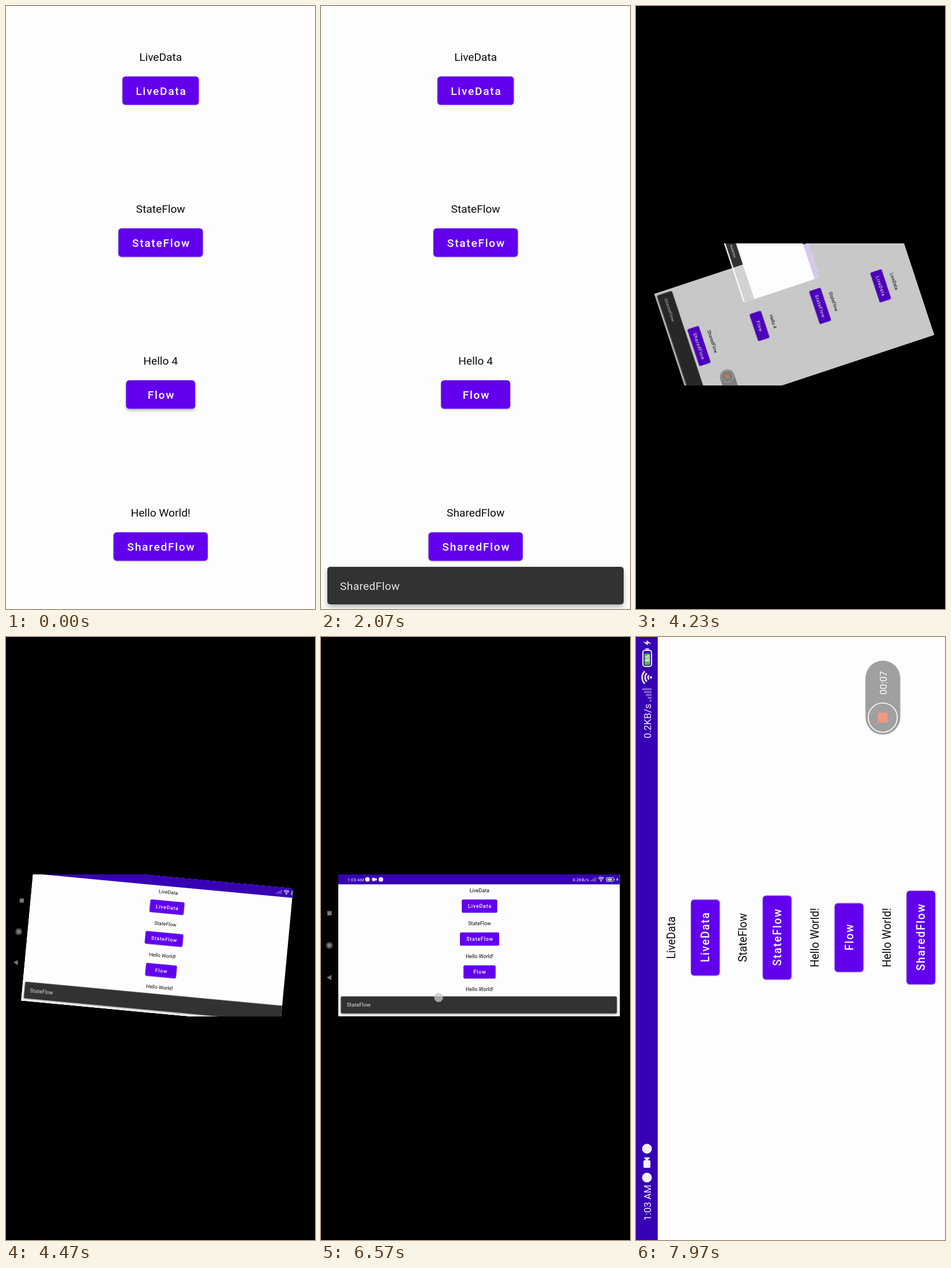
Animation, 536 px wide and 1044 px high, one loop 8 s. Source, as an HTML page:

```html
<!DOCTYPE html>
<html lang="en">
<head>
<meta charset="utf-8">
<title>Flow demo</title>
<style>
  html, body { margin: 0; width: 100%; height: 100%; overflow: hidden; background: #000; }
  svg { display: block; width: 536px; height: 1044px; font: 19.2px Roboto, sans-serif; }
  .label { font-weight: 500; letter-spacing: .0893em; fill: #fff; text-anchor: middle; }
  .title { fill: #0a0a0a; text-anchor: middle; }
  .button { filter: drop-shadow(0 1.5px 1.5px rgba(0, 0, 0, .28)); }
  .snack { filter: drop-shadow(0 4px 4px rgba(0, 0, 0, .3)); }
  .snack text { fill: #e4e4e4; letter-spacing: .0178em; }
  .status { font-size: 16.8px; fill: #f4f0ff; }
  .bubble text { font-size: 16.5px; fill: #fff; }
</style>
</head>
<body>
<svg id="stage" viewBox="0 0 536 1044"></svg>
<script>
const LOOP = 8000;
const ITEMS = [['LiveData', 132.5], ['StateFlow', 146.5], ['Flow', 120], ['SharedFlow', 163.5]];
const HELLO = 'Hello World!';

const item = (prefix, i, cx, cy, title) => {
  const [name, w] = ITEMS[i];
  return `<text class="title" id="${prefix}Title${i}" x="${cx}" y="${cy - 51.8}">${title}</text>
    <rect class="button" id="${prefix}Button${i}" x="${cx - w / 2}" y="${cy - 24.6}" width="${w}" height="49.2" rx="5.5" fill="#6200ee"/>
    <text class="label" x="${cx + 1.2}" y="${cy + 7.3}">${name}</text>`;
};

const snackbar = (id, x, y, w, text) => `<g id="${id}" class="snack">
  <rect x="${x}" y="${y}" width="${w}" height="65" rx="5" fill="#323232"/>
  <text x="${x + 22}" y="${y + 40}">${text}</text></g>`;

const bubble = (id, x, y, time) => `<g id="${id}" class="bubble" transform="translate(${x} ${y})">
  <rect width="128" height="60.5" rx="30.2" fill="#a0a0a0"/>
  <circle cx="29.5" cy="30" r="25.2" fill="none" stroke="#fff" stroke-width="1.6"/>
  <rect x="21" y="21.5" width="17" height="17" rx="3" fill="#f09a80"/>
  <text x="69" y="36.5">${time}</text></g>`;

const statusBar = () => {
  const bars = [0, 1, 2, 3, 4].map(i =>
    `<rect x="${932 + i * 5}" y="${23.5 - i * 3.2}" width="3.4" height="${3.5 + i * 3.2}" opacity=".4"/>`).join('');
  const waves = [5, 10, 15].map(r => {
    const d = r * .72;
    return `<path d="M${974 - d} ${26 - d}A${r} ${r} 0 0 1 ${974 + d} ${26 - d}" fill="none" stroke="#f4f0ff" stroke-width="2.6"/>`;
  }).join('');
  return `<g class="status"><rect width="1044" height="37.7" fill="#3700b3"/>
    <g id="notices">
      <text x="33.5" y="25.5">1:03 AM</text>
      <circle cx="108" cy="19" r="8.5"/><circle cx="158" cy="19" r="8.5"/>
      <path d="M125 14.5q0-1.5 1.5-1.5h10q1.5 0 1.5 1.5v3l5-4v11l-5-4v3q0 1.5-1.5 1.5h-10q-1.5 0-1.5-1.5z"/>
      <text id="speed" x="868.5" y="25.5"></text>
    </g>${bars}${waves}
    <circle cx="974" cy="26" r="2"/>
    <rect x="993" y="12" width="28" height="15" rx="4" fill="none" stroke="#f4f0ff" stroke-width="2"/>
    <rect x="995.5" y="14.5" width="20" height="10" rx="1.5" fill="#55b848"/>
    <rect x="1022.5" y="16.5" width="2" height="6"/>
    <text x="1007" y="23.6" font-size="11" font-weight="700" text-anchor="middle">86</text>
    <path d="M1036 12l-6.5 8.5h4l-2 6.5 7-8.5h-4z"/></g>`;
};

const portraitTitles = ['LiveData', 'StateFlow', 'Hello 4', HELLO];
const landTitles = ['LiveData', 'StateFlow', HELLO, HELLO];

document.getElementById('stage').innerHTML = `
  <defs>
    <clipPath id="letterbox"><rect y="411" width="536" height="246"/></clipPath>
    <clipPath id="crop"><rect id="cropRect" x="-20" y="411" height="246" rx="6"/></clipPath>
    <clipPath id="pressed"><rect x="186.4" y="911.2" width="163.5" height="49.2" rx="5.5"/></clipPath>
    <clipPath id="screen"><rect width="1044" height="538"/></clipPath>
  </defs>
  <rect width="536" height="1044" fill="#000"/>
  <g id="window">
    <g id="land"><g id="landCrop">
      <g id="nav" fill="#777">
        <rect x="11" y="474.5" width="7.5" height="7.5"/>
        <circle cx="14.5" cy="534" r="5.4" fill="none" stroke="#777"/><circle cx="14.5" cy="534" r="4"/>
        <path d="M10 589.5l8-4.5v9z"/>
      </g>
      <g id="landScreen"><g clip-path="url(#screen)">
        <rect width="1044" height="538" fill="#fdfdfd"/>
        ${statusBar()}
        <g transform="translate(523.5 0) scale(.991 1.012)">
          ${ITEMS.map((_, i) => item('l', i, 0, 118.6 + i * 123.2, landTitles[i])).join('')}
        </g>
        ${snackbar('landSnack', 9.6, 462, 1023, 'StateFlow')}
        ${bubble('landBubble', 875, 398, '00:07')}
      </g></g>
      <circle id="landDot" cx="204" cy="624.5" r="7.5" fill="#ccc" stroke="#999" stroke-width=".6"/>
    </g></g>
    <g id="port">
      <rect width="536" height="1044" fill="#fdfdfd"/>
      ${ITEMS.map((_, i) => item('p', i, 268.2, 146.5 + i * 263.1, portraitTitles[i])).join('')}
      <g clip-path="url(#pressed)"><circle id="ripple" cx="312" cy="939" fill="#fff"/></g>
      <circle id="portDot" cx="312" cy="939" r="15" fill="#ddd"/>
      ${snackbar('portSnack', 11, 971, 514, 'SharedFlow')}
      ${bubble('portBubble', 398, 834.5, '00:03')}
    </g>
  </g>`;

const el = {};
document.querySelectorAll('[id]').forEach(e => el[e.id] = e);

const ramp = (t, a, b) => Math.min(1, Math.max(0, (t - a) / (b - a)));
const set = (id, attrs) => { for (const k in attrs) el[id].setAttribute(k, attrs[k]); };
const show = (id, on) => { el[id].style.display = on ? '' : 'none'; };
const fade = (id, a) => { show(id, a > 0); set(id, { opacity: a }); };
const write = (id, s) => { if (el[id].textContent !== s) el[id].textContent = s; };
const lift = (id, k) => {
  el[id].style.filter = `drop-shadow(0 ${1.5 + 1.5 * k}px ${1.5 + k}px rgba(0,0,0,.28))`;
};

function drawPortrait(t) {
  write('pTitle3', t < 950 ? HELLO : 'SharedFlow');
  lift('pButton2', 1 - ramp(t, 30, 250));
  lift('pButton3', ramp(t, 600, 700) * (1 - ramp(t, 1070, 1250)));

  const grow = ramp(t, 600, 800);
  set('ripple', { r: 30 + 110 * grow });
  fade('ripple', .24 * Math.min(1, grow * 3) * (1 - ramp(t, 1080, 1330)));
  fade('portDot', t < 600 ? 0 : .55 * (1 - ramp(t, 900, 1230)));

  const k = ramp(t, 978, 1128);
  const s = .8 + .2 * (1 - (1 - k) ** 2.3);
  set('portSnack', { transform: `translate(268 1003.5) scale(${s}) translate(-268 -1003.5)` });
  fade('portSnack', k);
  show('portBubble', t >= 3730);
}

function drawLandscape(t) {
  write('speed', t < 6200 ? '0.6KB/s' : '0.2KB/s');
  fade('notices', ramp(t, 4570, 4900));
  fade('landSnack', 1 - ramp(t, 7000, 7130));
  fade('landDot', t < 6570 ? 0 : .75 * (1 - ramp(t, 6570, 6770)));
  show('landBubble', t >= 7630);
}

function place(t) {
  const boxed = t >= 3770 && t < 7670;
  const turning = boxed && t < 4540;
  // left: share of the quarter turn still to go
  const left = (1 + Math.cos(Math.PI * ramp(t, 4100, 4540))) / 2;

  set('window', { 'clip-path': boxed ? 'url(#letterbox)' : 'none' });
  show('port', t < 4540);
  show('land', t >= 3770);
  show('nav', boxed);

  if (turning) {
    const s = .5 + .5 * left;
    set('port', {
      transform: `translate(274.5 534) rotate(${90 * left}) scale(${.457 * s} ${.468 * s}) translate(-268 -522)`,
      opacity: 1 - ramp(1 - left, .1, .6)
    });
    set('land', {
      transform: `translate(272 514) rotate(${90 * left}) scale(${1 - .541 * left}) translate(-272 -514)`
    });
    set('cropRect', { width: 539 - 370 * left });
  } else {
    set('port', { transform: '', opacity: 1 });
    set('land', { transform: '' });
  }
  set('landCrop', { 'clip-path': turning ? 'url(#crop)' : 'none' });
  set('landScreen', {
    transform: t < 7670 ? 'translate(30 411) scale(.468 .457)' : 'matrix(0 -1 1 0 0 1044)'
  });
}

const start = performance.now();
function frame() {
  const t = (performance.now() - start) % LOOP;
  drawPortrait(t);
  drawLandscape(t);
  place(t);
  requestAnimationFrame(frame);
}
frame();
</script>
</body>
</html>
```
